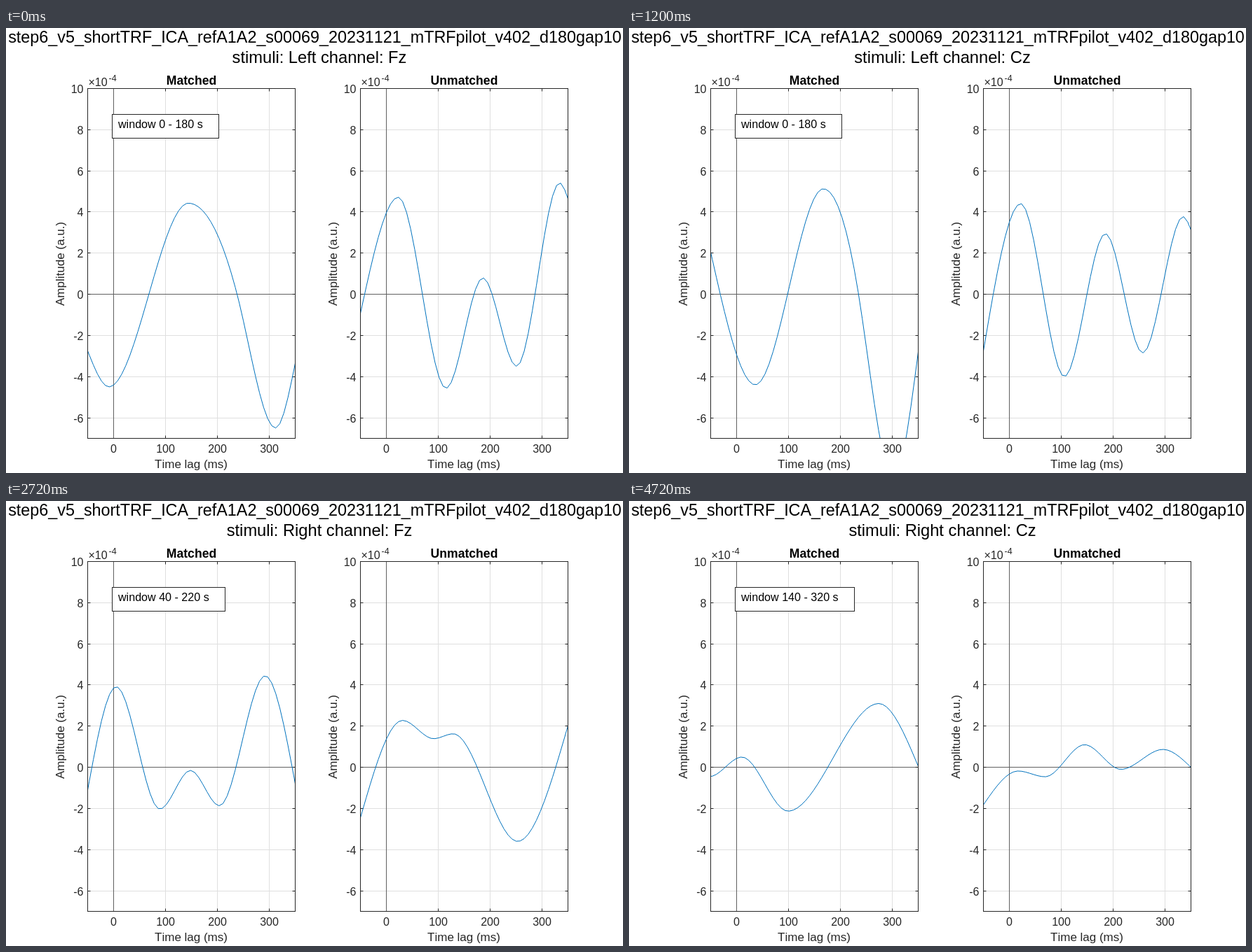
Write an HTML page with a canvas that moves like this. It is 880 px wide and 636 px high and loops after 4800 ms.

```html
<!DOCTYPE html>
<html lang="en">
<head>
<meta charset="utf-8">
<style>
html, body { margin: 0; width: 100%; height: 100%; overflow: hidden; background: #fff; }
canvas { display: block; }
</style>
</head>
<body>
<canvas id="stage" width="880" height="636"></canvas>
<script>
const ctx = document.getElementById('stage').getContext('2d');
const STEP = 80, WINDOWS = 15, SAMPLE = 1000 / 128;
const INK = '#262626', GRID = '#dfdfdf', ZERO = '#606060', BLUE = '#0072bd';
const LEFT = 116.5, TOP = 86.5, WIDTH = 296, HEIGHT = 500;
const MIN_LAG = -50, MAX_LAG = 350;

// Flat at turning points, steep on flanks and where a wave runs out of the plot.
function slope(points, i) {
  const [x, y] = points[i];
  if (x < MIN_LAG || x > MAX_LAG) return 0;
  const [x0, y0] = points[i - 1] || points[i];
  const [x1, y1] = points[i + 1] || points[i];
  return (y - y0) * (y1 - y) < 0 ? 0 : 1.5 * (y1 - y0) / (x1 - x0);
}

// Smooth wave through a few [lag in ms, amplitude] points, sampled at 128 Hz.
function wave(...points) {
  return Array.from({ length: 53 }, (_, k) => {
    const lag = (k - 7) * SAMPLE;
    let i = 0;
    while (i < points.length - 2 && lag > points[i + 1][0]) i++;
    const [x0, y0] = points[i], [x1, y1] = points[i + 1];
    const h = x1 - x0, u = (lag - x0) / h, v = 1 - u;
    return y0 + (y1 - y0) * u * u * (3 - 2 * u) +
      h * u * v * (slope(points, i) * v - slope(points, i + 1) * u);
  });
}

// Each pose: matched and unmatched response.
const fzLeftStart = [
  wave([-50, -2.75], [-9, -4.5], [144, 4.43], [238, 0], [312, -6.5], [350, -3.35]),
  wave([-50, -.93], [23, 4.72], [115, -4.57], [186, .8], [251, -3.5], [334, 5.42], [350, 4.65])];
const fzLeftLate = [
  wave([-52, -3.7], [27, 5.32], [106, -2.95], [187, 3.43], [301, -3.57], [350, -2]),
  wave([-50, .1], [29, 6.3], [130, -5.78], [210, -.6], [254, -1.57], [360, 2.55])];
const czLeftStart = [
  wave([-50, 2.05], [36, -4.4], [167, 5.13], [235, 0], [302, -9], [350, -2.8]),
  wave([-50, -2.75], [22, 4.41], [106, -4], [185, 2.95], [257, -2.85], [335, 3.78], [350, 3.13])];
const czLeftLate = [
  wave([-52, -1.75], [61, 2.98], [153, -1.53], [226, 2.07], [319, -4.88], [350, -2.92]),
  wave([-50, -1.4], [24, 4.28], [132, -2.27], [202, -1.38], [225, -1.42], [328, 1.82], [350, 1.71])];
const fzRight = [
  wave([-50, 1.42], [0, 3.03], [105, -5.12], [206, 0], [293, 7.62], [350, .15]),
  wave([-50, -3.85], [30, 4.09], [133, 0], [188, -3.72], [281, 2.4], [358, -.9])];
const czRightEarly = [
  wave([-50, -1.1], [5, 3.92], [89, -2.03], [148, -.15], [204, -1.87], [292, 4.45], [350, -.8]),
  wave([-50, -2.45], [31, 2.28], [91, 1.39], [129, 1.63], [253, -3.6], [350, 2.02])];
const czRightLate = [
  wave([-52, -.45], [10, .5], [99, -2.13], [274, 3.1], [350, .05]),
  wave([-50, -1.82], [17, -.18], [69, -.46], [145, 1.1], [215, -.1], [296, .87], [350, 0])];

const scenes = [
  { label: 'Left channel: Fz', keys: [[0, fzLeftStart], [9, fzLeftLate], [17, czLeftLate]] },
  { label: 'Left channel: Cz', keys: [[0, czLeftStart], [12, czLeftLate]] },
  { label: 'Right channel: Fz', keys: [[4, czRightEarly], [11, fzRight]] },
  { label: 'Right channel: Cz', keys: [[5, czRightEarly], [14, czRightLate]] }
];

const px = lag => LEFT + (lag - MIN_LAG) / (MAX_LAG - MIN_LAG) * WIDTH;
const py = value => TOP + (10 - value) / 17 * HEIGHT;
const snap = v => Math.floor(v) + .5;

function line(color, ...points) {
  ctx.strokeStyle = color;
  ctx.beginPath();
  for (let i = 0; i < points.length; i += 2) ctx.lineTo(points[i], points[i + 1]);
  ctx.stroke();
}

function text(string, x, y, size, align = 'center', color = INK, weight = '') {
  ctx.font = `${weight} ${size}px "Liberation Sans", Arial, sans-serif`;
  ctx.fontKerning = 'none';
  ctx.textAlign = align;
  ctx.fillStyle = color;
  ctx.fillText(string, x, y);
}

function plot(shift, title, samples) {
  const right = LEFT + WIDTH, bottom = TOP + HEIGHT;
  ctx.save();
  ctx.translate(shift, 0);

  for (let lag = 0; lag <= 300; lag += 100) {
    const x = snap(px(lag));
    line(lag ? GRID : ZERO, x, TOP, x, bottom);
    line(INK, x, bottom, x, bottom - 4);
    line(INK, x, TOP, x, TOP + 4);
    text(lag, x, 607, 16);
  }
  for (let level = -6; level <= 10; level += 2) {
    const y = snap(py(level));
    line(level ? GRID : ZERO, LEFT, y, right, y);
    line(INK, LEFT, y, LEFT + 4, y);
    line(INK, right, y, right - 4, y);
    text(level, 110.5, y + 6, 16, 'right');
  }
  line(ZERO, snap(px(0)), TOP, snap(px(0)), bottom);

  ctx.save();
  ctx.beginPath();
  ctx.rect(LEFT, TOP, WIDTH, HEIGHT);
  ctx.clip();
  line(BLUE, ...samples.flatMap((value, k) => [px((k - 7) * SAMPLE), py(value)]));
  ctx.restore();

  ctx.strokeStyle = INK;
  ctx.strokeRect(LEFT, TOP, WIDTH, HEIGHT);
  text('×10', 117.5, 83, 16, 'left');
  text('-4', 146.5, 76, 12.5, 'left');
  text(title, 264.5, 81, 17.6, 'center', '#000', 'bold');
  text('Time lag (ms)', 264, 629, 17);
  ctx.translate(83, 337);
  ctx.rotate(-Math.PI / 2);
  text('Amplitude (a.u.)', 0, 0, 17);
  ctx.restore();
}

// Blend between neighbouring poses; the outer spans carry on in a straight line.
function pose(keys, index) {
  let i = 0;
  while (i < keys.length - 2 && index > keys[i + 1][0]) i++;
  const [[t0, a], [t1, b]] = [keys[i], keys[i + 1]];
  const f = (index - t0) / (t1 - t0);
  return a.map((curve, side) => curve.map((v, k) => v + (b[side][k] - v) * f));
}

function draw(now) {
  const step = Math.floor(now / STEP) % (WINDOWS * scenes.length);
  const index = step % WINDOWS, start = index * 10;
  const { label, keys } = scenes[Math.floor(step / WINDOWS)];
  const [matched, unmatched] = pose(keys, index);

  ctx.fillStyle = '#fff';
  ctx.fillRect(0, 0, 880, 636);
  ctx.lineWidth = 1;
  text('step6_v5_shortTRF_ICA_refA1A2_s00069_20231121_mTRFpilot_v402_d180gap10', 440.5, 21, 23.35, 'center', '#000');
  text('stimuli: ' + label, 447, 50, 23.7, 'center', '#000');
  plot(0, 'Matched', matched);
  plot(389, 'Unmatched', unmatched);

  const boxWidth = 143 + 9 * String(start).length;
  ctx.fillStyle = '#fff';
  ctx.fillRect(151.5, 123.5, boxWidth, 34);
  ctx.strokeStyle = INK;
  ctx.strokeRect(151.5, 123.5, boxWidth, 34);
  text(`window ${start} - ${start + 180} s`, 160, 143, 16.1, 'left', '#000');
}

const begin = performance.now();
function tick() {
  draw(performance.now() - begin);
  requestAnimationFrame(tick);
}
tick();
</script>
</body>
</html>
```
